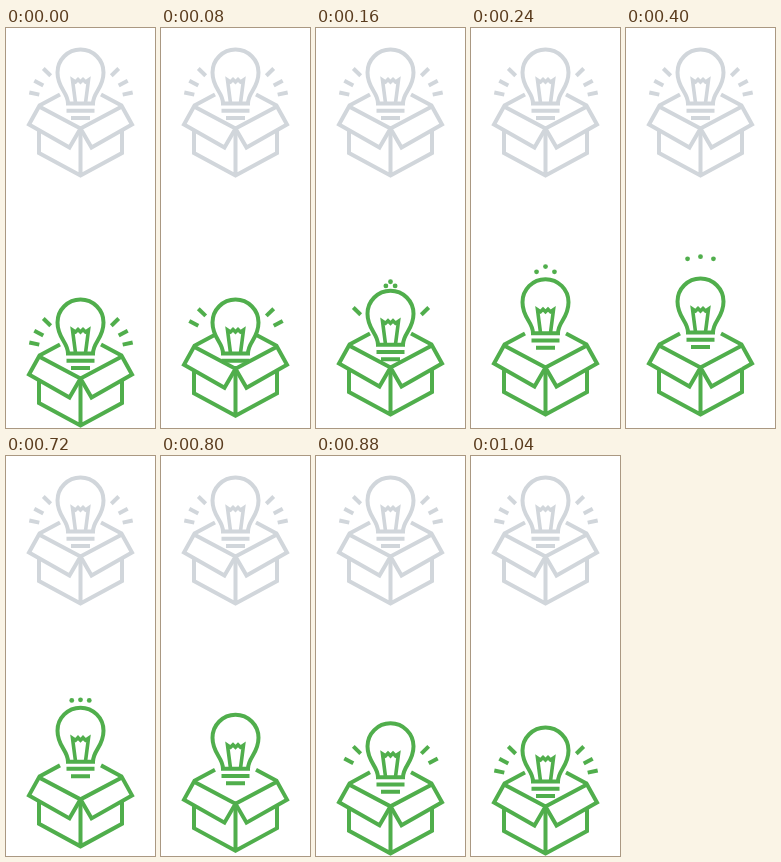
Write an HTML page that moves like this. It is 149 px wide and 400 px high and loops after 1560 ms.

```html
<!DOCTYPE html>
<html lang="en">
<head>
<meta charset="utf-8">
<title>Idea box</title>
<style>
  html, body { margin: 0; width: 100%; height: 100%; overflow: hidden; background: #fff; }
  svg { display: block; width: 149px; height: 400px; }
  .icon { fill: #fff; stroke: currentColor; stroke-width: 4; stroke-miterlimit: 6; }
  .open { fill: none; }
  .thin { stroke-width: 3.6; }
  .dots { fill: currentColor; stroke: none; }
</style>
</head>
<body>
<svg viewBox="0 0 149 400">
  <defs>
    <g id="bulb">
      <path d="M62 75.5C62 64 51.5 60.5 51.5 44.5A23 23 0 0 1 97.5 44.5C97.5 60.5 87 64 87 75.5Z"/>
      <path class="open thin" d="M69.5 75L66.5 52L69.5 54L72 51.5L74.5 54L77 51.5L79.5 54L82.5 52L79.5 75"/>
      <path class="open" d="M60.5 82.7H88.5M65 90H84"/>
    </g>
    <path id="rim" class="open" d="M54 66.5L33 77.8M95 66.5L116 77.8"/>
    <g id="front">
      <path d="M33 102V125L74.5 147.5L116 125V102L74.5 100.5V147"/>
      <path d="M74.5 100.5L33 78.5L23 96.5L63.5 119.5Z"/>
      <path d="M74.5 100.5L116 78.5L126 96.5L85.5 119.5Z"/>
    </g>
  </defs>
  <g class="icon" color="#d1d6db">
    <g class="rays"></g>
    <use href="#rim"/><use href="#bulb"/><use href="#front"/>
  </g>
  <g class="icon" color="#50ae4c">
    <g class="dots"></g>
    <g id="liveRays" class="rays"></g>
    <use id="liveRim" href="#rim"/>
    <use id="liveBulb" href="#bulb"/>
    <use id="liveFront" href="#front"/>
  </g>
</svg>
<script>
  const LOOP = 1560, STEP = 40, TURN = 560, DROP = 250;
  const MID = 74.5, RAY_MID = 75;

  // Left rays, outer end then inner end; the right side mirrors them.
  const RAYS = [[37.3, 40.5, 44.7, 47.7], [28.3, 52.7, 37.3, 57.5], [23.3, 64.5, 33.3, 66.6]];

  const $ = id => document.getElementById(id);
  const lerp = (a, b, k) => a + (b - a) * k;
  const ramp = (t, from, to) => Math.min(1, Math.max(0, (t - from) / (to - from)));
  const easeOut = (p, power) => 1 - (1 - p) ** power;
  const smooth = p => p * p * (3 - 2 * p);

  const boxLift = t => -11 * (easeOut(ramp(t, 0, 120), 2) - smooth(ramp(t, 600, 900)));
  const bulbLift = t => -21 * (smooth(ramp(t, 80, 260)) - smooth(ramp(t, 680, 960)));
  const dotRise = (t, power) => easeOut(ramp(t, 100, TURN), power) - ramp(t, TURN, 830) ** 2;

  // Rays vanish from the lowest up and return from the highest down.
  const rayLength = (t, i) => t < TURN
    ? 1 - ramp(t, 160 - 60 * i, 200 - 60 * i)
    : ramp(t, 800 + 40 * i, 840 + 40 * i);

  function add(parent, name) {
    return parent.appendChild(document.createElementNS("http://www.w3.org/2000/svg", name));
  }

  function set(el, attrs) {
    for (const name in attrs) el.setAttribute(name, attrs[name]);
  }

  function drawRay(el, [x1, y1, x2, y2], side, length) {
    const x = v => RAY_MID + side * (v - RAY_MID);
    set(el, {
      x1: x(lerp(x2, x1, length)), y1: lerp(y2, y1, length), x2: x(x2), y2,
      visibility: length > 0 ? "visible" : "hidden"
    });
  }

  const rays = [];
  for (const group of document.querySelectorAll(".rays")) {
    RAYS.forEach((ray, i) => [1, -1].forEach(side => {
      const el = add(group, "line");
      drawRay(el, ray, side, 1);
      if (group.id) rays.push({ el, ray, side, i });
    }));
  }
  const dots = [-1, 0, 1].map(side => ({ el: add(document.querySelector(".dots"), "circle"), side }));

  function draw(t) {
    const move = (id, y) => set($(id), { transform: `translate(0 ${DROP + y})` });
    ["liveRays", "liveRim", "liveFront"].forEach(id => move(id, boxLift(t)));
    move("liveBulb", bulbLift(t));
    for (const { el, ray, side, i } of rays) drawRay(el, ray, side, rayLength(t, i));
    for (const { el, side } of dots) {
      const k = dotRise(t, side ? 3 : 4);
      set(el, { cx: MID + side * 13.5 * k, cy: lerp(273, side ? 229 : 228, k), r: k > 0 ? 2.4 : 0 });
    }
  }

  const start = performance.now();
  function tick() {
    const t = (performance.now() - start) % LOOP;
    draw(Math.floor(t / STEP) * STEP);
    requestAnimationFrame(tick);
  }
  tick();
</script>
</body>
</html>
```
